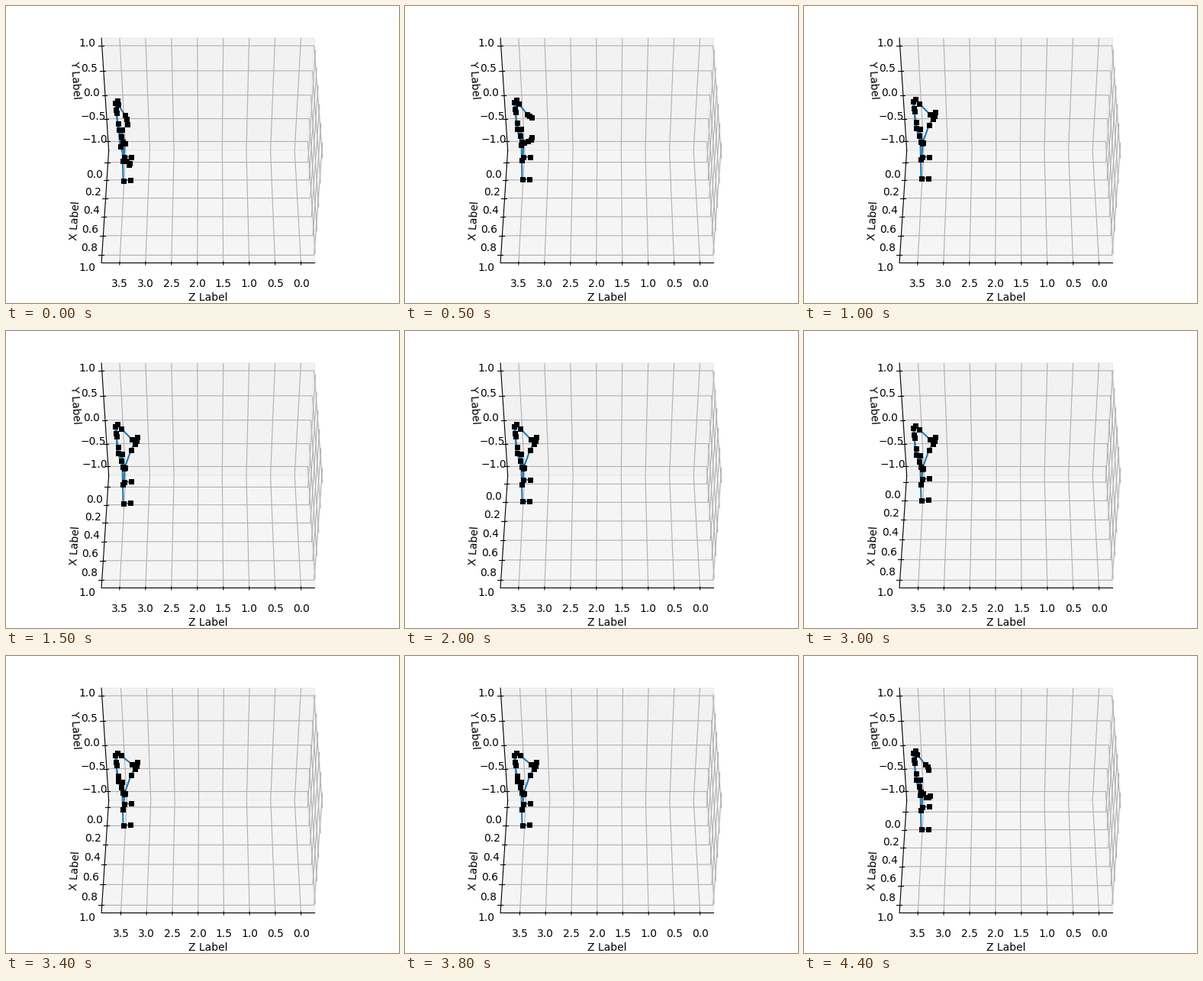
A matplotlib script that plays this animation: 515 by 389 pixels, repeating every 4.5 s.

```python
import numpy as np
import matplotlib.pyplot as plt
from matplotlib.animation import FuncAnimation
from matplotlib.collections import LineCollection

W, H, DPI = 515, 389, 100
FRAMES, INTERVAL = 45, 100

# Perspective box seen at 45 degrees
CX, CY, SX, SY, DIST = 264.7, 189.2, 268.1, 199.8, 10
R = np.sqrt(0.5)
E = 0.5 + 1 / 48          # half side of the drawn box
TEXT = E + 0.0738         # tick label distance
NAME = E + 0.1605         # axis name distance
OUT, IN = 1 / 60, 1 / 120  # tick lengths


def proj(z, x, y):
    f = DIST / (DIST - (x + y) * R)
    return CX - z * SX * f, CY - (y - x) * R * SY * f


def unit(v, lo, hi):
    """Data value to box coordinate, with a 5% margin on both sides."""
    return ((v - lo) / (hi - lo) - 0.5) / 1.1


def smooth(t, start, length):
    p = np.clip((t - start) / length, 0, 1)
    return p * p * (3 - 2 * p)


# Motion curves over time in seconds
def lift(t):
    """Arms: 0 hanging, 1 held forward."""
    return smooth(t, 0, 0.95) - smooth(t, 3.9, 0.85)


def slide(t):
    """Sideways shift of the feet, followed by the x limit."""
    return smooth(t, 1.4, 1) - smooth(t, 3.8, 0.7)


def lean(t):
    return np.exp(-((t - 3.6) / 0.6) ** 2)


# Resting skeleton, each chain running from its root outwards
SPINE = np.array([(151, 171), (147, 154), (145, 140), (144, 136),
                  (143.5, 127)])
LEG_R = np.array([(152.5, 162.5), (156, 180), (155, 198.5), (164, 198)])
LEG_L = np.array([(153, 178.5), (153.5, 201), (154, 226.5), (163, 226)])
# Shoulder to fingertip, hanging and lifted
ARM_R = np.array([[(146, 124), (147, 129), (156, 143), (158, 148), (159, 155)],
                  [(146, 124), (151.5, 129), (165, 142), (169, 142),
                   (172, 139)]])
ARM_L = np.array([[(148, 162), (150, 184), (158, 203), (161, 208), (162, 206)],
                  [(147, 162), (155.5, 181), (164.5, 156), (169, 148),
                   (171, 144.5)]])


def drop(points, amount):
    """Move points down by an amount in pixels."""
    return points + np.outer(np.broadcast_to(amount, len(points)), (0, 1))


def pose(t):
    """Joint positions and bone chains."""
    up, side = lift(t), slide(t)
    nod = 6 * lean(t) - 1.5 * up

    def sway(points):
        return drop(points, nod * np.clip((185 - points[:, 1]) / 30, 0, 1))

    spine = sway(SPINE)
    feet = -4.2 * side * np.array([0, 0, 1, 1])
    step = 2.5 * (1 - up) * np.array([0, 1, 1, 1])
    legs = [sway(drop(LEG_R, feet)), sway(drop(LEG_L, feet + step))]
    arms = []
    for hang, held in (ARM_R, ARM_L):
        arm = hang + (held - hang) * up
        fade = np.clip(1 - np.arange(5) / 2, 0, 1)
        arms.append(arm + (sway(arm) - arm) * fade[:, None])

    chains = [spine - 0.5] + [c - 0.5 for c in legs + arms]
    roots = [spine[0]] * 2 + [spine[2]] * 2
    bones = chains[:1] + [np.vstack([r - 0.5, c])
                          for r, c in zip(roots, chains[1:])]
    return np.vstack(chains), bones


# Tick value -> grid path, tick mark and label anchor, in box coordinates
def z_tick(v):
    return ([(v, E, -E), (v, -E, -E), (v, -E, E)],
            [(v, E + OUT, -E), (v, E - IN, -E)], (v, TEXT, -TEXT))


def x_tick(v):
    return ([(E, v, -E), (-E, v, -E), (-E, v, E)],
            [(E + OUT, v, -E), (E - IN, v, -E)], (TEXT, v, -TEXT))


def y_tick(v):
    return ([(E, -E, v), (-E, -E, v), (-E, E, v)],
            [(E + OUT, -E, v), (E - IN, -E, v)], (TEXT, -TEXT, v))


TICKS = ([(z_tick, "z", v) for v in np.arange(8) * 0.5]
         + [(x_tick, "x", v) for v in np.arange(6) * 0.2]
         + [(y_tick, "y", v) for v in np.arange(-2, 3) * 0.5])

plt.rcParams["font.family"] = "DejaVu Sans"
fig = plt.figure(figsize=(W / DPI, H / DPI), dpi=DPI, facecolor="white")
ax = fig.add_axes([0, 0, 1, 1])
ax.set_xlim(0, W)
ax.set_ylim(H, 0)
ax.axis("off")


def pane(corners, shade):
    ax.fill(*zip(*(proj(*c) for c in corners)), fc=str(shade), ec=str(shade),
            lw=1, alpha=0.5, zorder=1)


pane([(-E, -E, -E), (-E, E, -E), (-E, E, E), (-E, -E, E)], 0.95)
pane([(-E, -E, -E), (E, -E, -E), (E, -E, E), (-E, -E, E)], 0.9)
pane([(-E, -E, -E), (E, -E, -E), (E, E, -E), (-E, E, -E)], 0.925)

front, corner, top = proj(E, E, -E), proj(E, -E, -E), proj(E, -E, E)
for a, b in ((proj(-E, E, -E), front), (corner, front), (corner, top)):
    ax.plot(*zip(a, b), color="k", lw=0.8, zorder=3)

tilt = np.degrees(np.arctan2(corner[1] - top[1], corner[0] - top[0]))
for name, at, angle in (("Z Label", (0, NAME, -NAME), 0),
                        ("X Label", (NAME, 0, -NAME), tilt),
                        ("Y Label", (NAME, -NAME, 0), -tilt)):
    ax.text(*proj(*at), name, size=10, ha="center", va="center",
            rotation=angle, rotation_mode="anchor")

grid = ax.add_collection(LineCollection([], colors="#b0b0b0", linewidths=0.8,
                                        zorder=2), autolim=False)
marks = [ax.plot([], [], "k", lw=0.8, zorder=3)[0] for _ in TICKS]
labels = [ax.text(0, 0, f"{v:.1f}".replace("-", "\u2212"), size=10,
                  ha="center", va="top") for _, _, v in TICKS]
limbs = ax.add_collection(LineCollection([], colors="#1f77b4", linewidths=1.5,
                                         zorder=5), autolim=False)
dots, = ax.plot([], [], "ks", ms=5.04, mew=0, zorder=6)


def update(i):
    t = i * INTERVAL / 1000
    limits = {"x": (-0.058 * (1 - slide(t)), 1), "y": (-1.05, 1),
              "z": (0, 3.59 + 0.027 * lean(t))}
    lines = []
    for (make, axis, v), mark, label in zip(TICKS, marks, labels):
        path, dash, at = make(unit(v, *limits[axis]))
        lines.append([proj(*p) for p in path])
        mark.set_data(*zip(*(proj(*p) for p in dash)))
        label.set_position(proj(*at))
    grid.set_segments(lines)
    joints, bones = pose(t)
    limbs.set_segments(bones)
    dots.set_data(joints[:, 0], joints[:, 1])
    return [grid, limbs, dots, *marks, *labels]


anim = FuncAnimation(fig, update, frames=FRAMES, interval=INTERVAL,
                     repeat=True, repeat_delay=0, blit=False)
plt.show()
```
